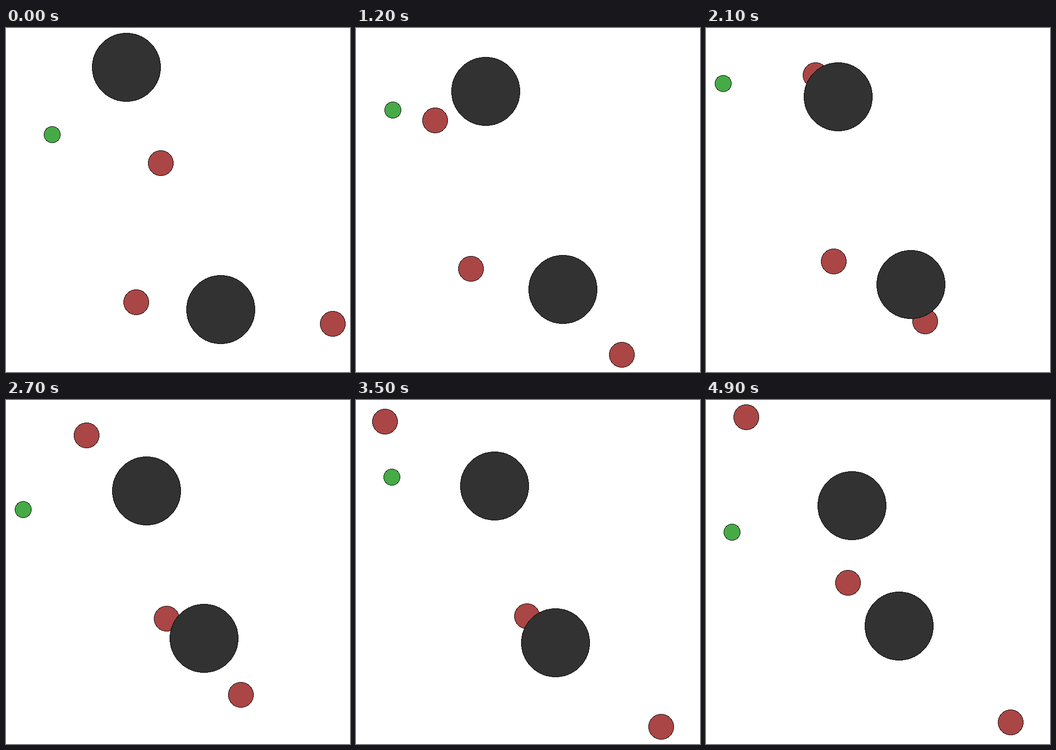
Animation of 700x700 px, one loop 5000 ms. Source, as an HTML page with a canvas:

```html
<!DOCTYPE html>
<html lang="en">
<head>
<meta charset="utf-8">
<title>Cells</title>
<style>
html, body { margin: 0; width: 100%; height: 100%; overflow: hidden; background: #fff; }
canvas { display: block; width: 700px; height: 700px; }
</style>
</head>
<body>
<canvas id="stage" width="700" height="700"></canvas>
<script>
const ctx = document.getElementById('stage').getContext('2d');
const STEP = 100, LOOP = 5000, SIZE = 700, MARGIN = 35;
const RED = '#aa4646', GREEN = '#46aa46', DARK = '#323232';

// Turning points of the walk, in steps; every curve passes through them.
const turns = [0, 12, 21, 27, 35, 42, 49];
const cells = [
  { r: 26, color: RED, x: [315, 161, 223, 164, 59, 47, 82], y: [275, 188, 96, 72, 44, 35, 35] },
  { r: 26, color: RED, x: [265, 234, 260, 327, 348, 333, 289], y: [558, 490, 475, 445, 440, 421, 372] },
  { r: 26, color: RED, x: [665, 541, 446, 478, 621, 628, 620], y: [602, 665, 597, 600, 665, 642, 656] },
  { r: 17, color: GREEN, x: [94, 75, 35, 35, 73, 71, 53], y: [217, 167, 113, 223, 157, 226, 269] }
];
// The two large cells share one distance as they drift together.
const drift = [0, 49, 60.4, 105, 94.8, 111, 135];

const clamp = (v, lo, hi) => Math.max(lo, Math.min(hi, v));

function slope(vals, i) {
  const a = Math.max(i - 1, 0), b = Math.min(i + 1, vals.length - 1);
  return (vals[b] - vals[a]) / (turns[b] - turns[a]);
}

// Smooth curve through the values at the turning points
function curve(vals, step) {
  const i = Math.max(1, turns.findIndex(t => t >= step));
  const span = turns[i] - turns[i - 1];
  const u = (step - turns[i - 1]) / span, v = 1 - u;
  return v * v * (1 + 2 * u) * vals[i - 1] + u * u * (1 + 2 * v) * vals[i]
    + span * u * v * (v * slope(vals, i - 1) - u * slope(vals, i));
}

const walk = (vals, step) => clamp(curve(vals, step), MARGIN, SIZE - MARGIN);

// Hard-edged disc, filled row by row
function disc(x, y, r, color) {
  ctx.fillStyle = color;
  for (let row = -r; row < r; row++) {
    const half = Math.round(Math.sqrt(r * r - (row + 0.5) ** 2));
    ctx.fillRect(x - half, y + row, 2 * half, 1);
  }
}

function cell(x, y, r, color) {
  x = Math.round(x);
  y = Math.round(y);
  disc(x, y, r, '#000');
  disc(x, y, r - 1, color);
}

function draw(step) {
  ctx.fillStyle = '#fff';
  ctx.fillRect(0, 0, SIZE, SIZE);
  for (const c of cells) cell(walk(c.x, step), walk(c.y, step), c.r, c.color);
  const d = curve(drift, step);
  cell(245.4 + 0.385 * d, 80 + d, 70, DARK);
  cell(437 - 0.326 * d, 573 - 0.837 * d, 70, DARK);
}

const start = performance.now();
function tick() {
  const t = (performance.now() - start) % LOOP;
  draw(Math.floor(t / STEP));
  requestAnimationFrame(tick);
}
tick();
</script>
</body>
</html>
```
